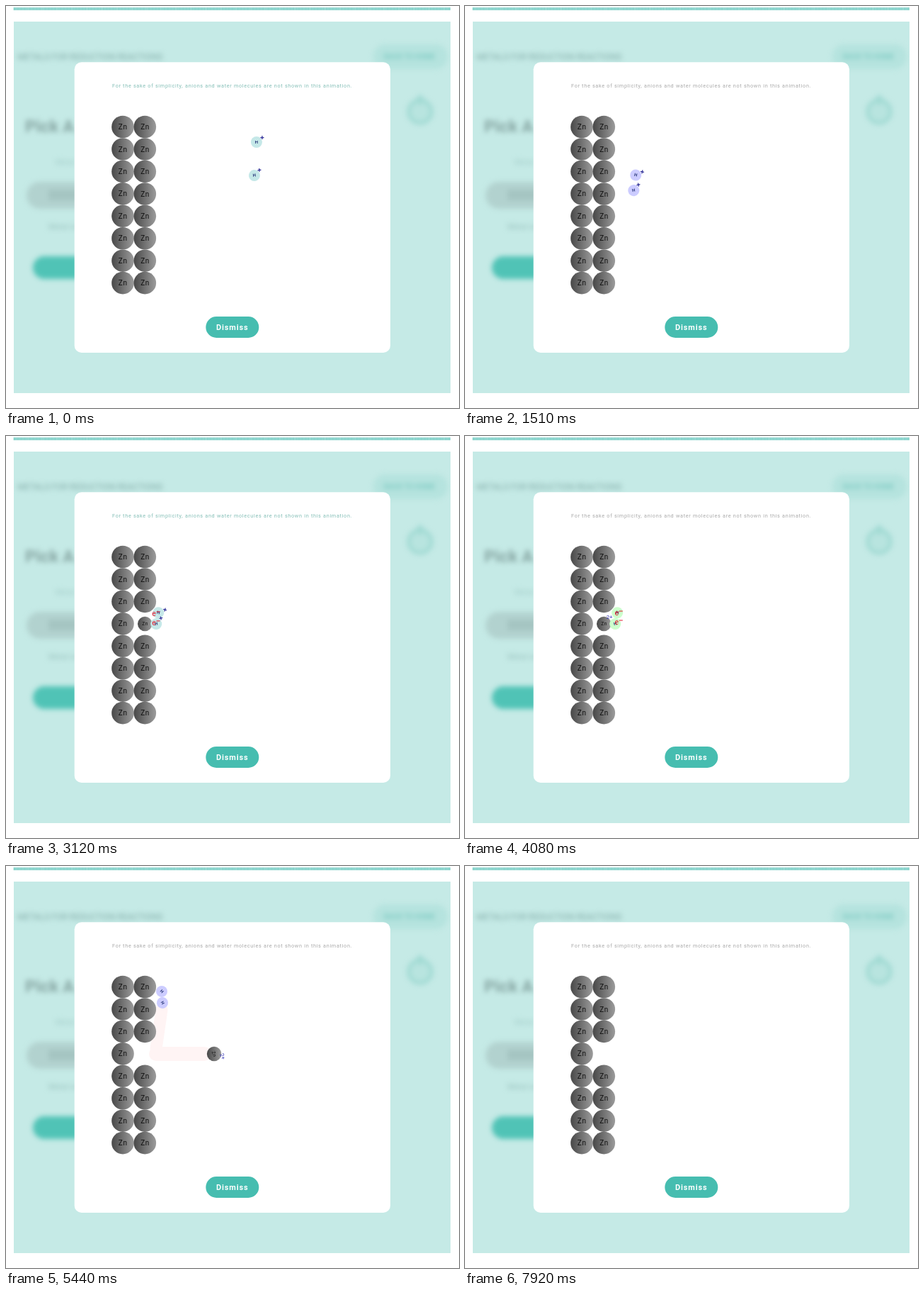
Animation of 640 by 567 pixels, one loop 8 s. Source, as an HTML page:

```html
<!DOCTYPE html>
<html lang="en">
<head>
<meta charset="utf-8">
<title>Zinc and hydrogen ions</title>
<style>
html, body { margin: 0; width: 100%; height: 100%; overflow: hidden; background: #fff; }
svg { display: block; width: 640px; height: 567px; font-family: Roboto, Inter, sans-serif; }
.mid { text-anchor: middle; }
.soft { filter: blur(3.5px); }
</style>
</head>
<body>
<svg id="stage" viewBox="0 0 640 567">
  <defs>
    <linearGradient id="metal">
      <stop offset="0" stop-color="#484848"/>
      <stop offset="1" stop-color="#9c9c9c"/>
    </linearGradient>
    <clipPath id="page"><rect x="11" y="22" width="617" height="524"/></clipPath>
  </defs>
  <path d="M11 4H628" stroke="#3fb8ac" stroke-width="4" stroke-dasharray="1.2 .9"/>
  <g clip-path="url(#page)">
    <rect x="11" y="22" width="617" height="524.5" fill="#c5eae6"/>
    <g class="soft">
      <text x="16" y="76" font-size="12" fill="#7fa8a4" textLength="">METALS FOR REDUCTION REACTIONS</text>
      <rect x="519" y="54" width="105" height="35" rx="17" fill="#b5e3de"/>
      <text x="570" y="75" class="mid" font-size="10" font-weight="700" fill="#7fcbc3">BACK TO HOME</text>
      <circle cx="585" cy="149" r="16" fill="#b8e4df" stroke="#9fd9d2" stroke-width="5"/>
      <path d="M585 126V138" stroke="#9fd9d2" stroke-width="7"/>
      <text x="27" y="178" font-size="24" font-weight="700" fill="#86a5a2">Pick A metal</text>
      <text x="70" y="224" font-size="11" fill="#a3ccc8">Metal</text>
      <rect x="29" y="248" width="120" height="38" rx="19" fill="#b2d2cf"/>
      <rect x="60" y="259" width="60" height="15" fill="#a5c5c2"/>
      <text x="60" y="315" font-size="11" fill="#97bfbb">Metal ion</text>
      <rect x="38" y="353" width="120" height="32" rx="16" fill="#50c3b6"/>
    </g>
  </g>
  <rect x="96.7" y="79.3" width="446.3" height="409.7" rx="10" fill="#fff"/>
  <text id="note" x="150" y="114.5" font-size="7.25" letter-spacing=".7">For the sake of simplicity, anions and water molecules are not shown in this animation.</text>
  <rect x="282.3" y="438" width="75" height="30" rx="15" fill="#46bdb0"/>
  <text x="297" y="456.8" font-size="11" font-weight="700" letter-spacing=".85" fill="#fff">Dismiss</text>
  <g id="scene"></g>
</svg>
<script>
const LOOP = 8000;
const scene = document.getElementById('scene');
const note = document.getElementById('note');
document.querySelector('[textLength]').removeAttribute('textLength');

function add(parent, tag, attrs, text) {
  const el = document.createElementNS('http://www.w3.org/2000/svg', tag);
  for (const k in attrs) el.setAttribute(k, attrs[k]);
  if (text) el.textContent = text;
  return parent.appendChild(el);
}
const set = (el, k, v) => el.setAttribute(k, v);

// Linear track: [[time, value], ...]
function track(keys, t) {
  if (t <= keys[0][0]) return keys[0][1];
  for (let i = 1; i < keys.length; i++) {
    const [t0, v0] = keys[i - 1], [t1, v1] = keys[i];
    if (t < t1) return v0 + (v1 - v0) * (t - t0) / (t1 - t0);
  }
  return keys[keys.length - 1][1];
}

function zinc(parent, label = parent) {
  add(parent, 'circle', { r: 15.8, fill: 'url(#metal)' });
  add(label, 'text', { class: 'mid', x: .3, y: 3.6, 'font-size': 10, 'letter-spacing': .7, fill: '#111' }, 'Zn');
}

const trailStyle = { fill: 'none', stroke: '#fff4f4', 'stroke-linecap': 'round' };
const ionTrail = add(scene, 'path', { ...trailStyle, 'stroke-width': 20 });
const gasTrail = add(scene, 'path', { ...trailStyle, 'stroke-width': 17 });

for (let row = 0; row < 8; row++) {
  for (let col = 0; col < 2; col++) {
    if (row === 3 && col === 1) continue;
    zinc(add(scene, 'g', { transform: `translate(${165 + col * 31.3} ${170.5 + row * 31.45})` }));
  }
}

const ion = add(scene, 'g', {});
const ionBall = add(ion, 'g', {});
const ionLabel = add(ion, 'g', {});
zinc(ionBall, ionLabel);
const ionCharge = add(ionLabel, 'text', { class: 'mid', x: 12, y: -11, 'font-size': 12, fill: '#3737b8' }, '2+');

function hydrogen(spec) {
  const g = add(scene, 'g', {});
  const ball = add(g, 'circle', { r: 8 });
  add(g, 'text', { class: 'mid', y: 1.8, 'font-size': 6, 'font-weight': 700, fill: '#263477' }, 'H');
  const plus = add(g, 'path', { d: 'M5.5 -6.5h5M8 -9v5', stroke: '#2b2b96', 'stroke-width': 1.2 });
  return { ...spec, g, ball, plus };
}
const atoms = [
  { x: [354, 215.2, 220], y: [192, 249.3, 177], turn: [0, 15, 45] },
  { x: [351, 212.3, 221], y: [239, 265, 193], turn: [-8, -12, 62] }
].map(hydrogen);

const electrons = [250, 263].map(y => {
  const g = add(scene, 'g', {});
  add(g, 'text', { class: 'mid', y: 3, 'font-size': 10.5, fill: '#e0192d' }, 'e');
  add(g, 'path', { d: 'M3.5 -3h5', stroke: '#e0192d', 'stroke-width': 1 });
  return { g, y };
});

const ARRIVE = 1860, LEAVE = 4260, MARK = 5440, END = 6200;
const tealTimes = [[0, 50], [3120, 3200], [6240, 6310], [6380, 6450], [6800, 6860],
  [6920, 6980], [7280, 7350], [7420, 7490], [7840, 7920]];
const fade = [[5880, 1], [6200, 0]];

// Approach, wait, then drift on at the same pace
function travel([a, b, c], t) {
  const last = b + (c - b) * (END - LEAVE) / (MARK - LEAVE);
  return track([[0, a], [ARRIVE, b], [LEAVE, b], [END, last]], t);
}

function render(t) {
  const teal = tealTimes.some(([a, b]) => t >= a && t < b);
  set(note, 'fill', teal ? '#83beb6' : '#a9a9a9');

  const zx = travel([196.3, 196.3, 294], t);
  const turn = travel([0, 0, 68], t);
  const scale = track([[1900, 1], [2700, .65]], t);
  const seen = track(fade, t);
  set(ion, 'transform', `translate(${zx} 265) scale(${scale})`);
  set(ion, 'opacity', seen);
  set(ionLabel, 'transform', `rotate(${turn})`);
  set(ionCharge, 'opacity', track([[3350, 0], [3900, 1]], t));

  const fill = teal ? '#c5e8e8' : t > 3200 && t < 4400 ? '#ccffcc' : '#ccccff';
  for (const a of atoms) {
    set(a.g, 'transform', `translate(${travel(a.x, t)} ${travel(a.y, t)}) rotate(${travel(a.turn, t)})`);
    set(a.g, 'opacity', seen);
    set(a.ball, 'fill', fill);
    set(a.plus, 'opacity', track([[3350, 1], [3850, 0]], t));
  }

  const glow = Math.min(track([[2000, 0], [2400, 1]], t), track([[4300, 1], [4700, 0]], t));
  const back = track([[2400, 1], [3420, 0]], t);
  const [hx, hy] = [travel(atoms[0].x, t), travel(atoms[0].y, t)];
  const rise = hy - atoms[0].y[1];
  for (const e of electrons) {
    const lift = t > LEAVE ? rise : 0;
    set(e.g, 'transform', `translate(${214.3 - 18 * back} ${e.y + 3 * back + lift})`);
    set(e.g, 'opacity', glow);
  }

  const moving = t > LEAVE + 150 && t < END;
  set(ionTrail, 'd', moving && zx > 212 ? `M212 265H${zx - 14}` : '');
  set(gasTrail, 'd', moving ? `M212 258L${hx} ${hy + 26}` : '');
}

const start = performance.now();
function tick(now) {
  render(Math.max(0, now - start) % LOOP);
  requestAnimationFrame(tick);
}
render(0);
requestAnimationFrame(tick);
</script>
</body>
</html>
```
